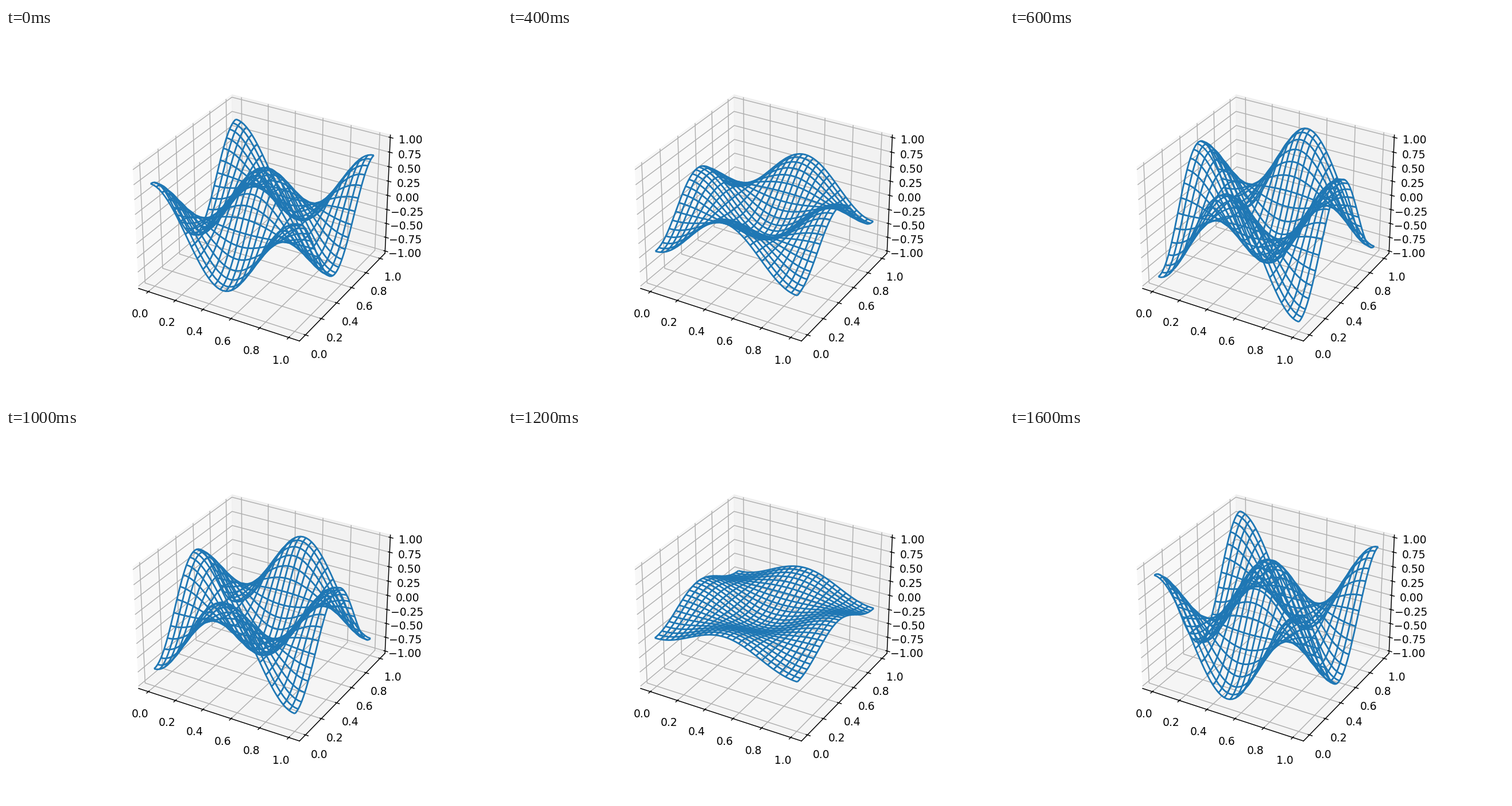
Write a matplotlib script that moves like this. It is 864x648 px and loops after 1.8 s.

```python
import numpy as np
import matplotlib.pyplot as plt
from matplotlib.animation import FuncAnimation

FRAMES = 9
INTERVAL = 200
STEP = np.pi / 5            # phase advance per frame
PHASE = np.radians(43)
ZLIM = 25 / 24              # unit range plus the usual 1/48 view margin

fig = plt.figure(figsize=(6.4, 4.8), dpi=135)
ax = fig.add_subplot(projection="3d")
ax.set_zlim(-ZLIM, ZLIM)

axis = np.linspace(0, 1, 51)
X, Y = np.meshgrid(axis, axis)
SHAPE = np.cos(2 * np.pi * X) * np.cos(2 * np.pi * Y)

wire = None


def draw(i):
    """Replace the mesh with the standing wave at step i."""
    global wire
    if wire is not None:
        wire.remove()
    Z = SHAPE * np.cos(PHASE + STEP * i)
    wire = ax.plot_wireframe(X, Y, Z, rstride=2, cstride=2)
    return [wire]


anim = FuncAnimation(fig, draw, frames=FRAMES, interval=INTERVAL,
                     init_func=lambda: draw(0), repeat=True, repeat_delay=0)
plt.show()
```
